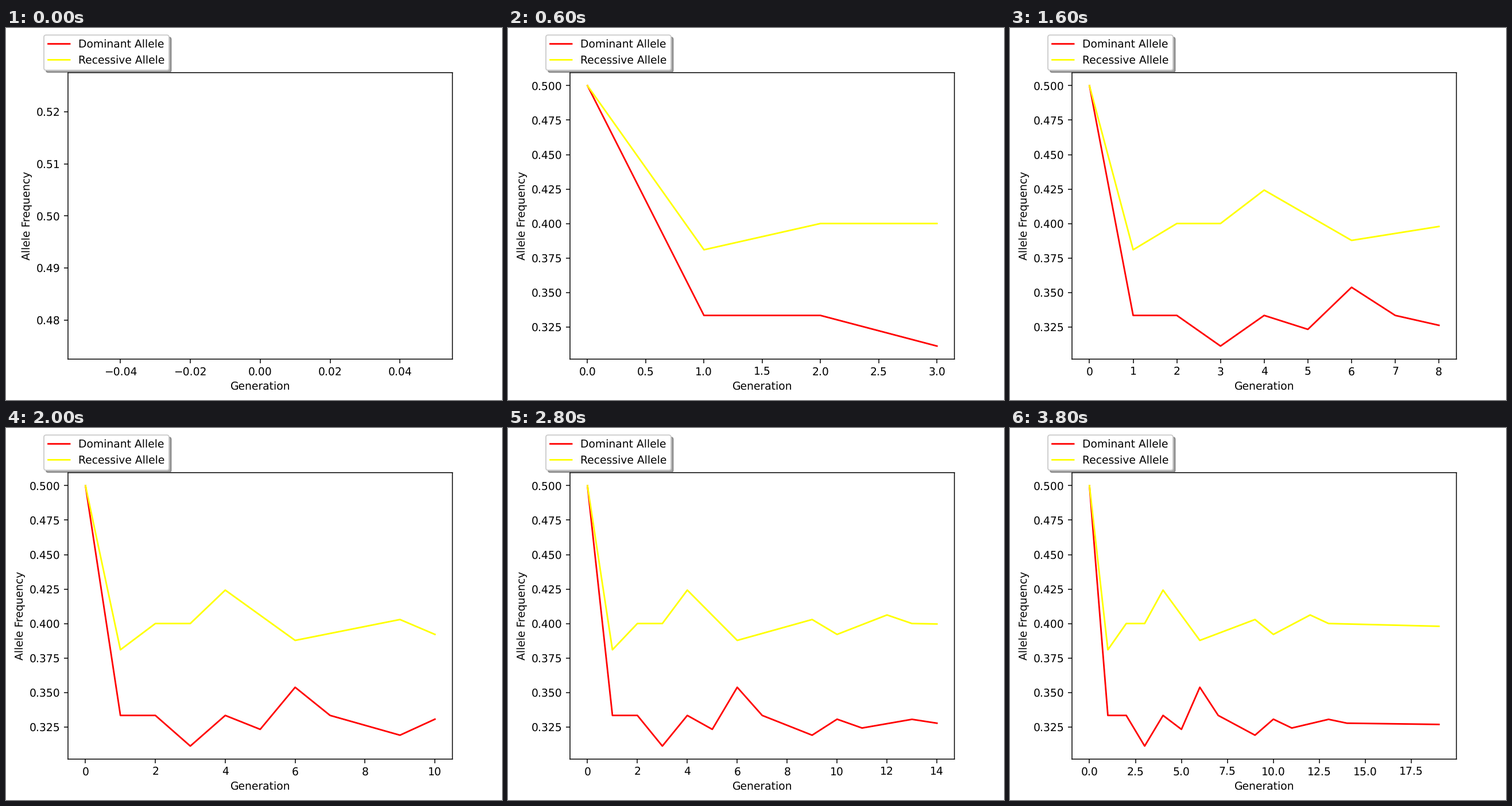
Animation, 864 px wide and 648 px high, one loop 4 s. Source, as a matplotlib script:

```python
import matplotlib.pyplot as plt
import numpy as np
from matplotlib.animation import FuncAnimation

GENERATIONS, LOOP_MS = 20, 4000

plt.rcParams.update({
    "font.family": "DejaVu Sans",
    "text.hinting": "none",
    "path.snap": False,
})

# Turning points {generation: frequency}; the drift between them is linear.
DOMINANT = {0: 1/2, 1: 1/3, 2: 1/3, 3: 14/45, 4: 1/3, 5: 32/99, 6: 52/147,
            7: 1/3, 9: 0.319, 10: 0.3306, 11: 0.3242, 13: 0.3305,
            14: 0.3277, 19: 0.3268}
RECESSIVE = {0: 1/2, 1: 8/21, 2: 2/5, 3: 2/5, 4: 14/33, 6: 19/49,
             9: 0.4029, 10: 0.3921, 12: 0.4062, 13: 0.4, 19: 0.398}

gens = np.arange(GENERATIONS)
fig, ax = plt.subplots(figsize=(6.4, 4.8), dpi=135)
ax.set_xlabel("Generation")
ax.set_ylabel("Allele Frequency")


def add_series(turns, color, label):
    """Add an empty line and return it with its frequency per generation."""
    line, = ax.plot([], [], color=color, label=label)
    return line, np.interp(gens, list(turns), list(turns.values()))


series = [add_series(DOMINANT, "red", "Dominant Allele"),
          add_series(RECESSIVE, "yellow", "Recessive Allele")]
ax.legend(loc="upper center", bbox_to_anchor=(0.1, 1.15),
          fancybox=True, shadow=True)


def update(gen):
    """Show all generations up to gen and refit the axes."""
    for line, freqs in series:
        line.set_data(gens[:gen + 1], freqs[:gen + 1])
    ax.relim()
    ax.autoscale_view()
    return [line for line, _ in series]


anim = FuncAnimation(fig, update, frames=GENERATIONS,
                     interval=LOOP_MS / GENERATIONS,
                     init_func=lambda: update(0), repeat=True, repeat_delay=0)
plt.show()
```
